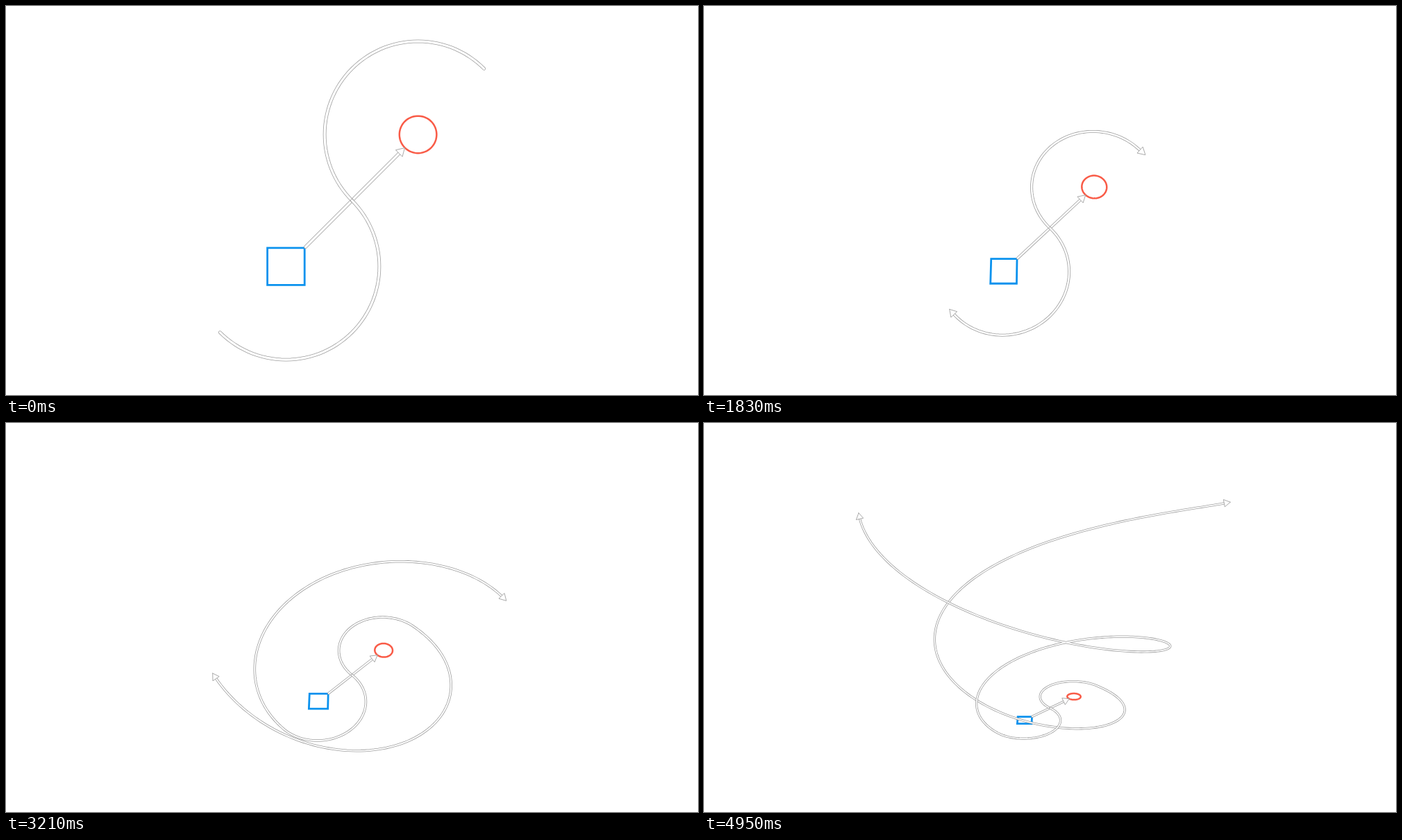
Animation, 997 px wide and 561 px high, one loop 4.98 s. Source, as an HTML page with a canvas:

```html
<!DOCTYPE html>
<html>
<head>
<meta charset="utf-8">
<style>
html, body { margin: 0; width: 100%; height: 100%; overflow: hidden; background: #fff; }
canvas { display: block; }
</style>
</head>
<body>
<canvas id="stage" width="997" height="561"></canvas>
<script>
const ctx = document.getElementById('stage').getContext('2d');
const LOOP = 4980, STEP = 30, FOCAL = 1122, MID_X = 498.5, MID_Y = 280.5;
const OFFSET = 95.1, RADIUS = OFFSET * Math.SQRT2, HALF = 26.8;
const GROW_START = 1.65, GRAY = '#a0a0a0', RAD = Math.PI / 180;

// The camera tilts, pulls back and raises its aim along the vertical axis.
function makeCamera(t) {
  const u = t / 4.95;
  const scale = 1 - .873 * u - .056 * u ** 2 + .302 * u ** 3;
  const tilt = (11.2 * t + .24 * t * t) * RAD;
  const aim = 91.5 * t - 2.2 * t * t;
  const c = Math.cos(tilt), s = Math.sin(tilt), cy = MID_Y + scale * aim * s;
  const project = (x, y, z = 0) => {
    const k = scale / (1 + scale * (y * s - z * c) / FOCAL);
    return [MID_X + k * x, cy - k * (y * c + z * s)];
  };
  return { scale, project };
}

// Degrees an arm has wound: quick start, slow finish
function reach(t, limit, rate, power) {
  const age = Math.max(0, t - GROW_START);
  return limit * (1 - Math.exp(-rate * age ** power));
}

// Rising, widening spiral that continues the flat half circle
function spiral(degrees) {
  const w = degrees / 180, a = (45 - degrees) * RAD, r = 2 * RADIUS + 112 * w ** 1.5;
  return [r * Math.cos(a), r * Math.sin(a) * (1 - .03 * w), 186 * w ** 1.8];
}

function armPoints(turn, side, project) {
  const points = [];
  const add = (x, y, z) => points.push(project(side * x, side * y, z));
  for (let a = 225; a >= 45; a -= 3)
    add(OFFSET + RADIUS * Math.cos(a * RAD), OFFSET + RADIUS * Math.sin(a * RAD), 0);
  const steps = Math.ceil(turn / 2);
  for (let i = 1; i <= steps; i++) add(...spiral(turn * i / steps));
  return points;
}

function trace(points, closed) {
  ctx.beginPath();
  points.forEach(p => ctx.lineTo(...p));
  if (closed) ctx.closePath();
}

function stroke(color, width) {
  ctx.strokeStyle = color;
  ctx.lineWidth = width;
  ctx.stroke();
}

function tube(points, scale) {
  const width = 2.4 + 2.4 * scale;
  trace(points);
  stroke(GRAY, width);
  stroke('#fff', width - 1.6);
}

// White line ending in a hollow triangular head
function arrow(points, scale) {
  const tip = points[points.length - 1], length = 7.5 + 4 * scale, wide = 4.2 + 2.4 * scale;
  const dist = p => Math.hypot(p[0] - tip[0], p[1] - tip[1]);
  const body = points.slice();
  while (body.length > 1 && dist(body[body.length - 1]) < length) body.pop();
  const from = body[body.length - 1], d = dist(from);
  const dx = (tip[0] - from[0]) / d, dy = (tip[1] - from[1]) / d;
  const bx = tip[0] - dx * length, by = tip[1] - dy * length;
  tube([...body, [bx, by]], scale);
  trace([tip, [bx - dy * wide, by + dx * wide], [bx + dy * wide, by - dx * wide]], true);
  ctx.fillStyle = '#fff';
  ctx.fill();
  stroke(GRAY, .9);
}

// Regular polygon around a point of the ground plane
function polygon(project, center, radius, sides, color, width) {
  const corners = Array.from({ length: sides }, (_, i) => {
    const a = (i + .5) / sides * 2 * Math.PI;
    return project(center + radius * Math.cos(a), center + radius * Math.sin(a));
  });
  trace(corners, true);
  stroke(color, width);
}

function draw(t) {
  const { scale, project } = makeCamera(t);
  ctx.fillStyle = '#fff';
  ctx.fillRect(0, 0, 997, 561);
  ctx.lineCap = 'round';

  polygon(project, -OFFSET, HALF * Math.SQRT2, 4, '#0a92ee', 2.8);
  polygon(project, OFFSET, HALF, 60, '#f95b47', 2.5);
  arrow([project(-67, -67), project(76, 76)], scale);

  const arm = t > GROW_START ? arrow : tube;
  arm(armPoints(reach(t, 440, .27, 1.8), 1, project), scale);
  arm(armPoints(reach(t, 412, .31, 2), -1, project), scale);
}

const start = performance.now();
function tick() {
  const ms = (performance.now() - start) % LOOP;
  draw(Math.floor(ms / STEP) * STEP / 1000);
  requestAnimationFrame(tick);
}
tick();
</script>
</body>
</html>
```
